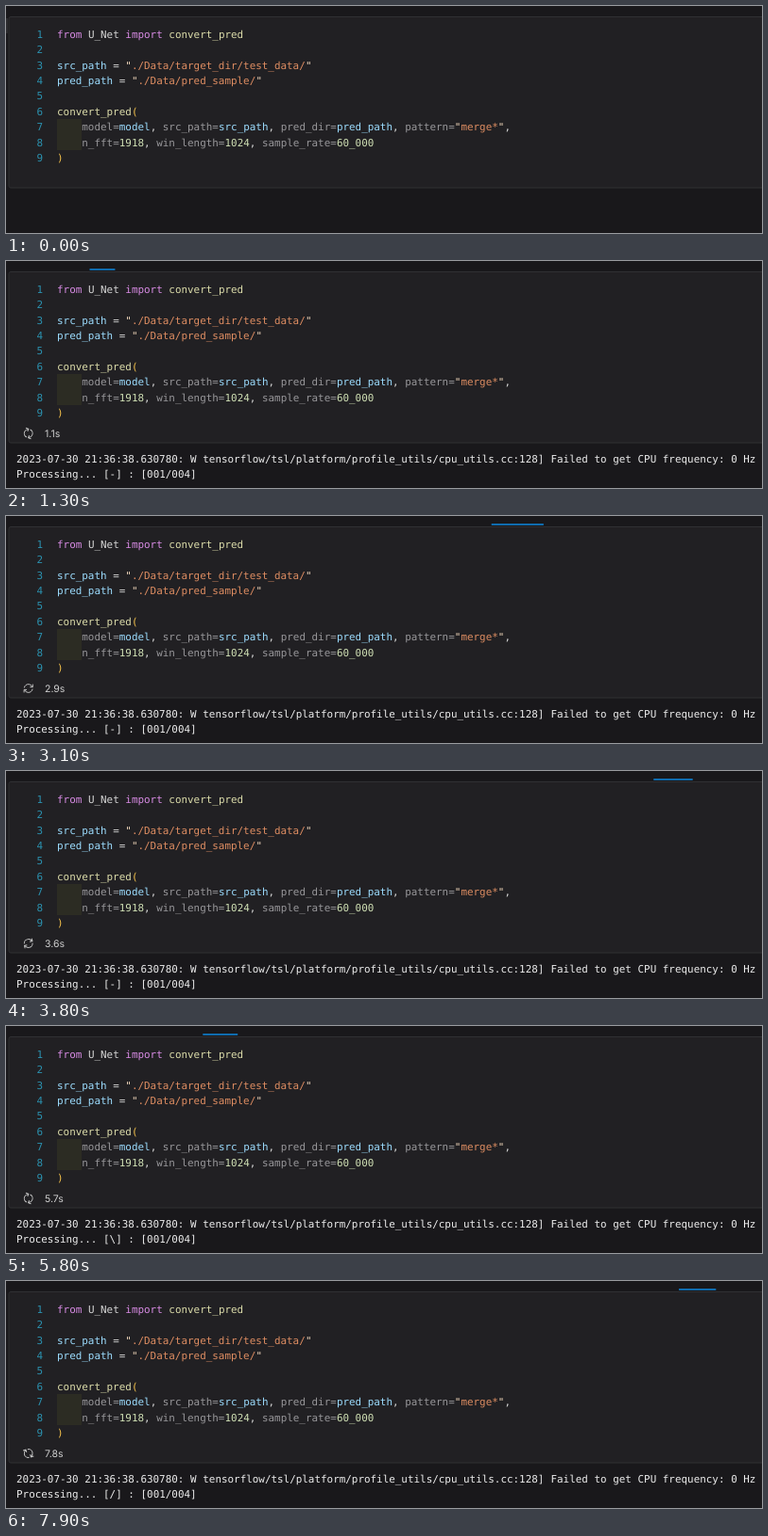
Write an HTML page with a canvas that moves like this. It is 800 px wide and 241 px high and loops after 8 s.

```html
<!DOCTYPE html>
<html lang="en">
<head>
<meta charset="utf-8">
<title>Notebook cell run</title>
<style>
html, body { margin: 0; width: 100%; height: 100%; overflow: hidden; background: #19181b; }
canvas { display: block; width: 800px; height: 241px; }
</style>
</head>
<body>
<canvas id="stage" width="800" height="241"></canvas>
<script>
const ctx = document.getElementById('stage').getContext('2d');
const LOOP = 8000, STEP = 100;
const CHAR = 6.575, LINE = 16.4;
const MONO = '10.92px "DejaVu Sans Mono", monospace';
const SANS = '10.5px Inter, sans-serif';

const color = {
  k: '#d88be4', // keyword
  w: '#d6d6d6', // plain
  f: '#dcdcaa', // function
  v: '#9cdcfe', // variable
  q: '#ecd3b8', // quote
  s: '#de8d62', // string
  b: '#f3c04b', // bracket
  p: '#98979a', // parameter
  n: '#cfdfb4'  // number
};

// Each line is a run of [kind, text] pairs.
const code = [
  [['k', 'from '], ['w', 'U_Net '], ['k', 'import '], ['f', 'convert_pred']],
  [],
  [['v', 'src_path'], ['w', ' = '], ['q', '"'], ['s', './Data/target_dir/test_data/'], ['q', '"']],
  [['v', 'pred_path'], ['w', ' = '], ['q', '"'], ['s', './Data/pred_sample/'], ['q', '"']],
  [],
  [['f', 'convert_pred'], ['b', '(']],
  [['p', '    model='], ['v', 'model'], ['w', ', '], ['p', 'src_path='], ['v', 'src_path'], ['w', ', '],
   ['p', 'pred_dir='], ['v', 'pred_path'], ['w', ', '], ['p', 'pattern='],
   ['q', '"'], ['s', 'merge*'], ['q', '"'], ['w', ',']],
  [['p', '    n_fft='], ['n', '1918'], ['w', ', '], ['p', 'win_length='], ['n', '1024'], ['w', ', '],
   ['p', 'sample_rate='], ['n', '60_000']],
  [['b', ')']]
];
const warning = '2023-07-30 21:36:38.630780: W tensorflow/tsl/platform/profile_utils/' +
  'cpu_utils.cc:128] Failed to get CPU frequency: 0 Hz';

function rect(x, y, w, h, fill) {
  ctx.fillStyle = fill;
  ctx.fillRect(x, y, w, h);
}

function text(str, x, y, fill, font = MONO) {
  ctx.font = font;
  ctx.fillStyle = fill;
  ctx.fillText(str, x, y);
}

// Words sit on the monospace grid.
function monoText(str, x, y, fill) {
  for (const m of str.matchAll(/\S+/g)) text(m[0], x + m.index * CHAR, y, fill);
}

function drawCell() {
  ctx.beginPath();
  ctx.roundRect(3, 11.5, 820, 181.5, 2);
  ctx.fillStyle = '#212023';
  ctx.fill();
  ctx.strokeStyle = '#303033';
  ctx.lineWidth = 1;
  ctx.stroke();
  rect(54, 120, 26, 33, '#2c2c23');
  code.forEach((line, i) => {
    const y = 33.8 + i * LINE;
    text(String(i + 1), 32.4, y, '#2b91af');
    let col = 0;
    for (const [kind, str] of line) {
      monoText(str, 54 + col * CHAR, y, color[kind]);
      col += str.length;
    }
  });
}

function drawSync(time) {
  const turn = Math.floor((time - 90) / 50) * 12;
  ctx.save();
  ctx.translate(23.7, 183);
  ctx.rotate(turn * Math.PI / 180);
  ctx.strokeStyle = '#c8c8c8';
  ctx.lineWidth = 0.95;
  for (let half = 0; half < 2; half++) {
    ctx.beginPath();
    ctx.arc(0, 0, 4.4, Math.PI * 1.04, Math.PI * 1.9);
    ctx.moveTo(4.6, -4.4);
    ctx.lineTo(4.6, -1.4);
    ctx.lineTo(1.7, -1.4);
    ctx.stroke();
    ctx.rotate(Math.PI);
  }
  ctx.restore();
}

// A bit that crosses a 978px track in 4 s, tripling in width midway.
function drawProgress(clock) {
  const track = 978, bit = track * 0.02;
  const t = (clock - 0.926) % 4;
  const scale = t < 2 ? 1 + t : 5 - t;
  const shift = t < 2 ? t * 0.25 : 0.5 + (t - 2) * 0.24;
  const width = bit * scale;
  rect(bit / 2 + shift * track - width / 2, 8, width, 2, '#0f6cae');
}

function draw(time) {
  const clock = time * 1.0023 / 1000;
  rect(0, 0, 800, 241, '#19181b');
  if (time < 100) rect(0, 13, 2, 16, '#2b2b2e');
  drawCell();
  if (time >= 100) {
    const tenths = Math.floor(Math.max(0, clock - 0.11) * 10 + 1e-6);
    drawSync(time);
    text((tenths / 10).toFixed(1) + 's', 41, 187, '#cfcfcf', SANS);
  }
  if (time >= 570) {
    const mark = '-\\|/'[Math.floor((time - 570) / 155) % 4];
    monoText(warning, 11, 213.8, '#ededed');
    monoText(`Processing... [${mark}] : [001/004]`, 11, 230.2, '#ededed');
  }
  if (time >= 1000) drawProgress(clock);
}

ctx.textRendering = 'geometricPrecision';
let start;
function tick(now) {
  if (start === undefined) start = now;
  draw(Math.floor(((now - start) % LOOP) / STEP) * STEP);
  requestAnimationFrame(tick);
}
draw(0);
requestAnimationFrame(tick);
</script>
</body>
</html>
```
